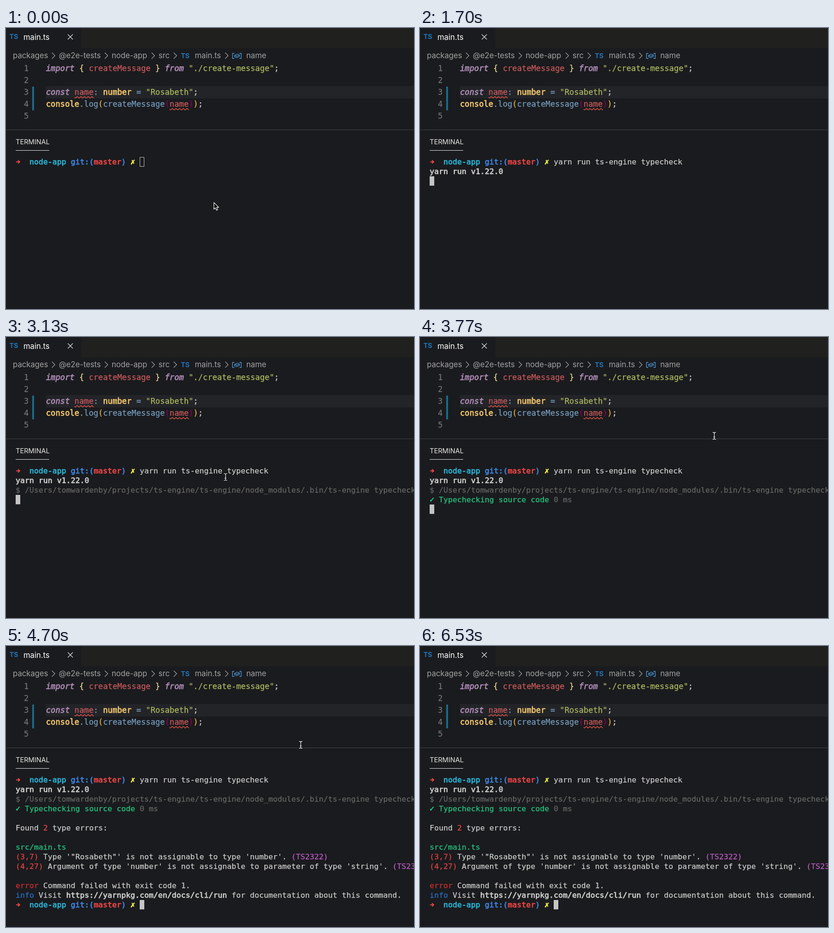
An HTML page with a canvas for the animation above (6.56 s loop, 888x614 px).

```html
<!DOCTYPE html>
<html lang="en">
<head>
<meta charset="utf-8">
<title>Typecheck in the terminal</title>
<style>
html, body { margin: 0; width: 100%; height: 100%; overflow: hidden; background: #1a1b1e; }
canvas { display: block; }
</style>
</head>
<body>
<canvas id="stage" width="888" height="614"></canvas>
<script>
const ctx = document.getElementById('stage').getContext('2d');
ctx.lineJoin = 'round';
const LOOP = 6560;
const MONO = '"DejaVu Sans Mono", monospace';
const MONO_ADVANCE = 0.602;
const SANS = 'Inter, "Liberation Sans", sans-serif';
const REGULAR = 0.25, BOLD = 0.8; // outline added to thicken the mono glyphs
const BG = '#1a1b1e', TEXT = '#cccccc', DIM = '#666666', RED = '#ee4646', CYAN = '#29b3d6',
  BLUE = '#3b86e6', YELLOW = '#f2f243', GREEN = '#23c982', PINK = '#bc5cc4', TS_BLUE = '#1f74b8';
const PURPLE = '#ac8ab4', ROSE = '#c8595b', LIME = '#adb85f', GOLD = '#eec36c', STEEL = '#759cbd',
  OUTER = '#f0b234', INNER = '#8f0058';

// Terminal history: time shown, row, runs of [text, colour, thickness]
const PROMPT = [['→', RED], ['  '], ['node-app', CYAN, BOLD], [' '], ['git:(', BLUE, BOLD],
  ['master', RED, BOLD], [')', BLUE, BOLD], [' '], ['✗', YELLOW, BOLD], [' ']];
const OUTPUT = [
  [0, 0, PROMPT],
  [1130, 0, [[' '.repeat(27)], ['yarn run ts-engine typecheck']]],
  [1600, 1, [['yarn run v1.22.0', TEXT, BOLD]]],
  [1800, 2, [['$ /Users/tomwardenby/projects/ts-engine/ts-engine/node_modules/.bin/ts-engine typecheck', DIM]]],
  [3700, 3, [['✓', GREEN, BOLD], [' Typechecking source code', GREEN], [' 0 ms', DIM]]],
  [4470, 5, [['Found '], ['2', RED], [' type errors:']]],
  [4470, 7, [['src/main.ts', GREEN]]],
  [4470, 8, [['(3,7)', '#e04343'], [' Type \'"Rosabeth"\' is not assignable to type \'number\'. '], ['(TS2322)', PINK]]],
  [4470, 9, [['(4,27)', '#e04343'], [" Argument of type 'number' is not assignable to parameter of type 'string'. "], ['(TS2345)', PINK]]],
  [4560, 11, [['error', '#cd3131'], [' Command failed with exit code 1.']]],
  [4560, 12, [['info', '#2472c8'], [' Visit '], ['https://yarnpkg.com/en/docs/cli/run', TEXT, BOLD], [' for documentation about this command.']]],
  [4630, 13, PROMPT],
];
// Block cursor: time, column, row
const CURSOR = [[0, 27, 0], [1130, 55, 0], [1430, 0, 1], [1600, 0, 2], [1800, 0, 3],
  [3700, 0, 4], [4470, 0, 11], [4560, 0, 13], [4630, 27, 13]];
const FOCUS = 400;
// Pointer path: time, x, y
const POINTER = [[2830, 455, 363], [3130, 477, 306], [3700, 640, 216], [4400, 640, 216],
  [4690, 641, 216], [6100, 641, 216], [6450, 900, 216]];

const CODE = [
  [['import', PURPLE, BOLD, 'italic'], [' '], ['{', '#ecd794'], [' '], ['createMessage', ROSE], [' '],
    ['}', '#ecd794'], [' '], ['from', PURPLE, BOLD, 'italic'], [' '], ['"./create-message"', LIME], [';']],
  [],
  [['const', PURPLE, BOLD, 'italic'], [' '], ['name', ROSE], [':', STEEL], [' '], ['number', GOLD, BOLD],
    [' '], ['=', STEEL], [' '], ['"Rosabeth"', LIME], [';']],
  [['console', GOLD, BOLD], ['.log', STEEL], ['(', OUTER], ['createMessage', STEEL], ['(', INNER],
    ['name', ROSE], [')', INNER], [')', OUTER], [';']],
  [],
];

function rect(x, y, w, h, color) {
  ctx.fillStyle = color;
  ctx.fillRect(x, y, w, h);
}

function label(text, x, y, size, color, weight = 400) {
  ctx.font = `${weight} ${size}px ${SANS}`;
  ctx.fillStyle = color;
  ctx.fillText(text, x, y);
}

function line(points, color, width = 1) {
  ctx.beginPath();
  for (const [x, y] of points) ctx.lineTo(x, y);
  ctx.strokeStyle = color;
  ctx.lineWidth = width;
  ctx.stroke();
}

function arrow(x, y) {
  line([[x + 1, y], [x + 8, y]], RED, 2);
  line([[x + 5, y - 3.5], [x + 9, y], [x + 5, y + 3.5]], RED, 2);
}

// Runs sit on a character grid of the given cell width
function runs(list, x, y, cell) {
  for (const [text, color = TEXT, thickness = REGULAR, style = 'normal'] of list) {
    if (text === '→') {
      arrow(x, y - 5.5);
    } else {
      ctx.font = `${style} ${cell / MONO_ADVANCE}px ${MONO}`;
      ctx.fillStyle = ctx.strokeStyle = color;
      ctx.lineWidth = thickness;
      ctx.fillText(text, x, y);
      ctx.strokeText(text, x, y);
    }
    x += text.length * cell;
  }
}

function squiggle(x, y) {
  const points = [];
  for (let i = 0; i <= 42; i++) points.push([x + i, y + 1.5 * Math.sin(i * Math.PI / 4)]);
  line(points, '#e8584a', 1.4);
}

function variableIcon() {
  const blue = '#4f9fdf';
  line([[497, 55.5], [493, 55.5], [493, 66.5], [497, 66.5]], blue, 1.3);
  line([[508, 55.5], [512, 55.5], [512, 66.5], [508, 66.5]], blue, 1.3);
  line([[497.5, 60], [503, 57], [508, 59], [508, 62], [502, 65], [497.5, 63], [497.5, 60],
    [502.3, 62], [508, 59]], blue, 1.3);
}

function drawEditor() {
  rect(0, 0, 888, 614, BG);
  rect(164, 0, 724, 44, '#20201f');
  label('TS', 7.5, 23.5, 14.5, TS_BLUE, 700);
  label('main.ts', 38, 26, 16.7, '#ffffff');
  line([[134.5, 14], [145.5, 25]], '#d6d6d6', 1.4);
  line([[145.5, 14], [134.5, 25]], '#d6d6d6', 1.4);

  const crumbs = [['packages', 15], ['@e2e-tests', 115], ['node-app', 230], ['src', 332], ['main.ts', 411], ['name', 523]];
  for (const [text, x] of crumbs) label(text, x, 66, 16.7, '#a2a2a3');
  for (const x of [100, 215, 317, 365, 477]) line([[x, 54], [x + 6.5, 60.5], [x, 67]], '#a2a2a3', 1.3);
  label('TS', 380.5, 65.5, 14.5, TS_BLUE, 700);
  variableIcon();

  rect(87, 127, 801, 27, '#232428');
  rect(57, 128, 4, 52, '#1b6b86');
  CODE.forEach((list, i) => {
    const y = 94 + 26 * i;
    runs([[String(i + 1), '#737476']], 39, y, 10.35);
    runs(list, 87, y, 10.35);
  });
  squiggle(149, 151.5);
  squiggle(356, 177.5);

  rect(0, 222, 888, 1, '#414244');
  label('TERMINAL', 21, 254, 14.6, '#e7e7e7');
  rect(21, 267, 73, 1, '#e7e7e7');
}

function drawTerminal(t) {
  for (const [start, row, list] of OUTPUT) if (t >= start) runs(list, 21, 298 + 21 * row, 10);
  const [, col, row] = CURSOR.filter(c => t >= c[0]).pop();
  const x = 21 + 10 * col, y = 282 + 21 * row;
  if (t >= FOCUS) return rect(x, y, 10, 20.5, '#c5c5c5');
  ctx.strokeStyle = '#c5c5c5';
  ctx.lineWidth = 1;
  ctx.strokeRect(x + 0.5, y + 0.5, 9, 20);
}

function ibeam(x, y) {
  for (const [color, width] of [['#000000', 3], ['#ffffff', 1.3]]) {
    line([[x, y - 6], [x, y + 6]], color, width);
    for (const side of [-1, 1]) {
      const end = y + 7.5 * side;
      line([[x - 3.5, end], [x - 1.5, end], [x, y + 6 * side], [x + 1.5, end], [x + 3.5, end]], color, width);
    }
    line([[x - 2, y + 2.5], [x + 2, y + 2.5]], color, width);
  }
}

function arrowPointer(x, y) {
  const shape = new Path2D(`M${x} ${y}v14.5l3.3-3.1 2.3 5.2 2.6-1.1-2.3-5.1h4.6z`);
  ctx.fillStyle = '#000000';
  ctx.fill(shape);
  ctx.strokeStyle = '#ffffff';
  ctx.lineWidth = 1.2;
  ctx.stroke(shape);
}

function drawPointer(t) {
  if (t < FOCUS) return arrowPointer(452.5, 381.5);
  if (t < 1130) return ibeam(452.5, 383);
  const i = POINTER.findIndex(p => p[0] > t);
  if (i < 1) return;
  const [t0, x0, y0] = POINTER[i - 1], [t1, x1, y1] = POINTER[i];
  const k = (t - t0) / (t1 - t0);
  ibeam(x0 + (x1 - x0) * k + 0.5, y0 + (y1 - y0) * k);
}

function frame() {
  const t = performance.now() % LOOP;
  drawEditor();
  drawTerminal(t);
  drawPointer(t);
  requestAnimationFrame(frame);
}
frame();
</script>
</body>
</html>
```
